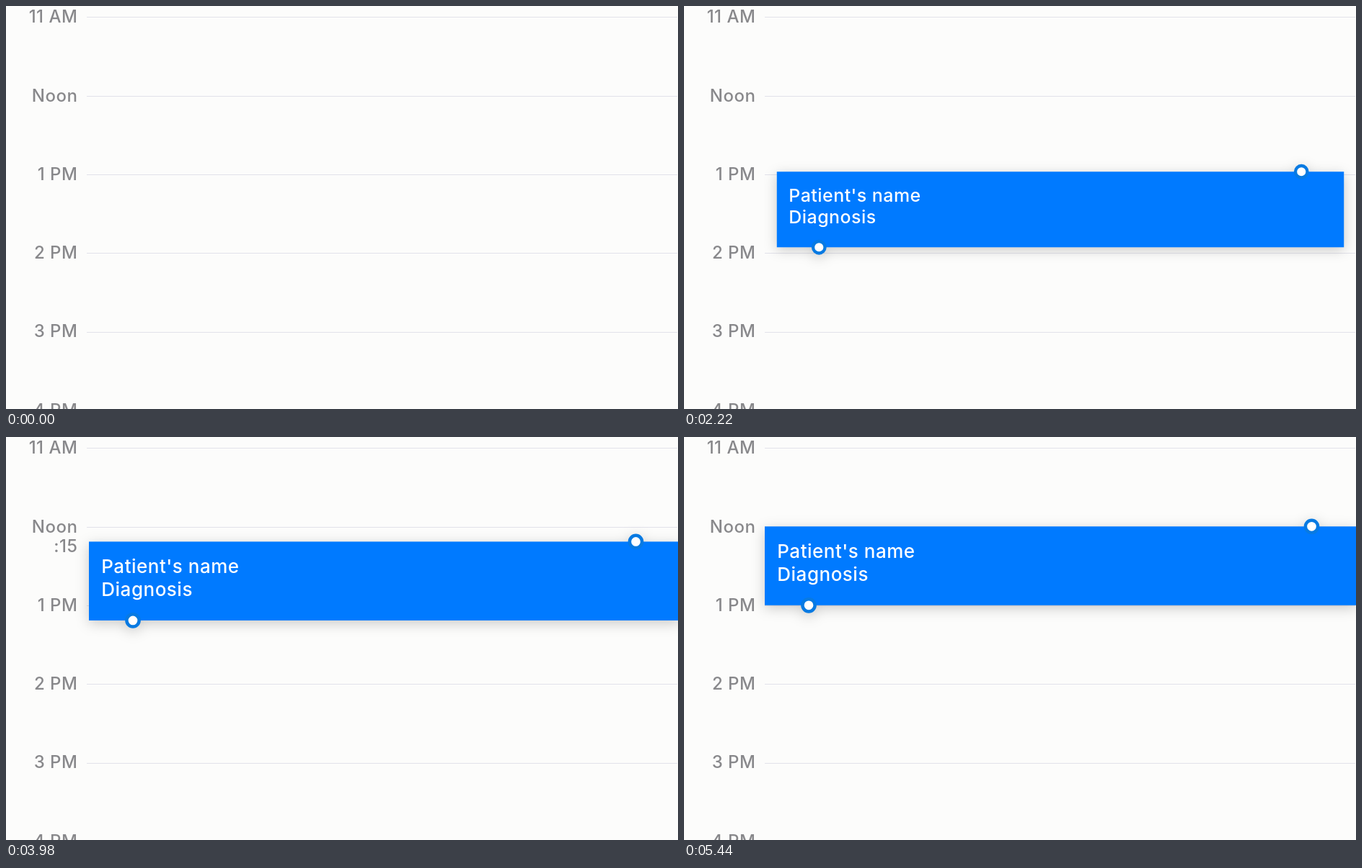
These frames come from a looping animation (932x560 px, 5460 ms). An HTML page:

```html
<!DOCTYPE html>
<html lang="en">
<head>
<meta charset="utf-8">
<title>Day view</title>
<style>
  html, body { margin: 0; width: 100%; height: 100%; overflow: hidden; background: #fcfcfb; }
  svg { display: block; width: 932px; height: 560px; }
  text { font-family: Inter, Roboto, sans-serif; font-weight: 500; letter-spacing: .5px; }
  #hours { font-size: 24px; text-anchor: end; fill: #88888b; }
  #event { filter: drop-shadow(0 4px 9px rgba(0, 0, 0, .2)); }
  #event text { font-size: 26px; fill: #fff; }
  circle { fill: #fff; stroke: #087ae2; stroke-width: 4.5; }
</style>
</head>
<body>
<svg viewBox="0 0 932 560">
  <rect width="932" height="560" fill="#fcfcfb"/>
  <g id="lines" fill="#e2e2ea"></g>
  <g id="hours"></g>
  <g id="event">
    <rect width="820" height="109.5" fill="#007aff"/>
    <text x="17.3" y="43.8">Patient's name</text>
    <text x="17.3" y="75.3">Diagnosis</text>
    <circle cx="758.5" cy="0" r="8.6"/>
    <circle cx="61" cy="109.5" r="8.6"/>
  </g>
</svg>
<script>
const LOOP = 5460, BORN = 2120, GROW = 280;
const HOUR = 109.3, NOON = 125.2, W = 820, H = 109.5;
const LABEL_X = 99.4, LABEL_DY = 7.3;
const $ = id => document.getElementById(id);
const clamp = v => Math.max(0, Math.min(1, v));

function add(parent, tag, attrs, text = '') {
  const el = document.createElementNS('http://www.w3.org/2000/svg', tag);
  for (const k in attrs) el.setAttribute(k, attrs[k]);
  el.textContent = text;
  return parent.appendChild(el);
}

const hourY = h => NOON + h * HOUR;

['11 AM', 'Noon', '1 PM', '2 PM', '3 PM', '4 PM'].forEach((name, i) => {
  const y = hourY(i - 1);
  add($('lines'), 'rect', { x: 112, y: Math.floor(y), width: 819, height: 1 });
  add($('hours'), 'text', { x: LABEL_X, y: y + LABEL_DY }, name);
});
const minute = add($('hours'), 'text', { x: LABEL_X });

// Drag path: time, left, top
const path = [
  [3260, 112, 228], [3560, 113, 201.5], [3980, 115, 145.5],
  [4300, 116, 125.5], [4720, 116.5, 123.7], [4940, 116.5, 123.7], [5240, 112, 124.3]
];

// Monotone cubic through the points of one column
function along(t, col) {
  const n = path.length - 1;
  if (t <= path[0][0]) return path[0][col];
  if (t >= path[n][0]) return path[n][col];
  const slope = k => (path[k + 1][col] - path[k][col]) / (path[k + 1][0] - path[k][0]);
  const tangent = k => {
    if (k === 0 || k === n) return 0;
    const a = slope(k - 1), b = slope(k);
    return a * b > 0 ? 2 * a * b / (a + b) : 0;
  };
  let k = 0;
  while (t > path[k + 1][0]) k++;
  const d = path[k + 1][0] - path[k][0], u = (t - path[k][0]) / d, v = 1 - u;
  return path[k][col] * v * v * (1 + 2 * u) + path[k + 1][col] * u * u * (3 - 2 * u)
    + d * u * v * (tangent(k) * v - tangent(k + 1) * u);
}

function draw(t) {
  const shown = t >= BORN;
  $('event').style.display = shown ? '' : 'none';
  minute.textContent = '';
  if (!shown) return;

  const x = along(t, 1), y = along(t, 2);
  const rest = 1 - clamp((t - BORN) / GROW);
  const s = 1 - 0.1 * rest * rest;
  $('event').setAttribute('transform',
    `translate(${x + W / 2 * (1 - s)} ${y + H / 2 * (1 - s)}) scale(${s})`);
  $('event').style.opacity = clamp((t - BORN + 20) / 80);

  const quarter = Math.round((y - NOON) / HOUR * 4);
  if (quarter % 4) {
    minute.textContent = ':' + quarter % 4 * 15;
    minute.setAttribute('y', hourY(quarter / 4) + LABEL_DY);
  }
}

function tick() {
  draw(performance.now() % LOOP);
  requestAnimationFrame(tick);
}
tick();
</script>
</body>
</html>
```
